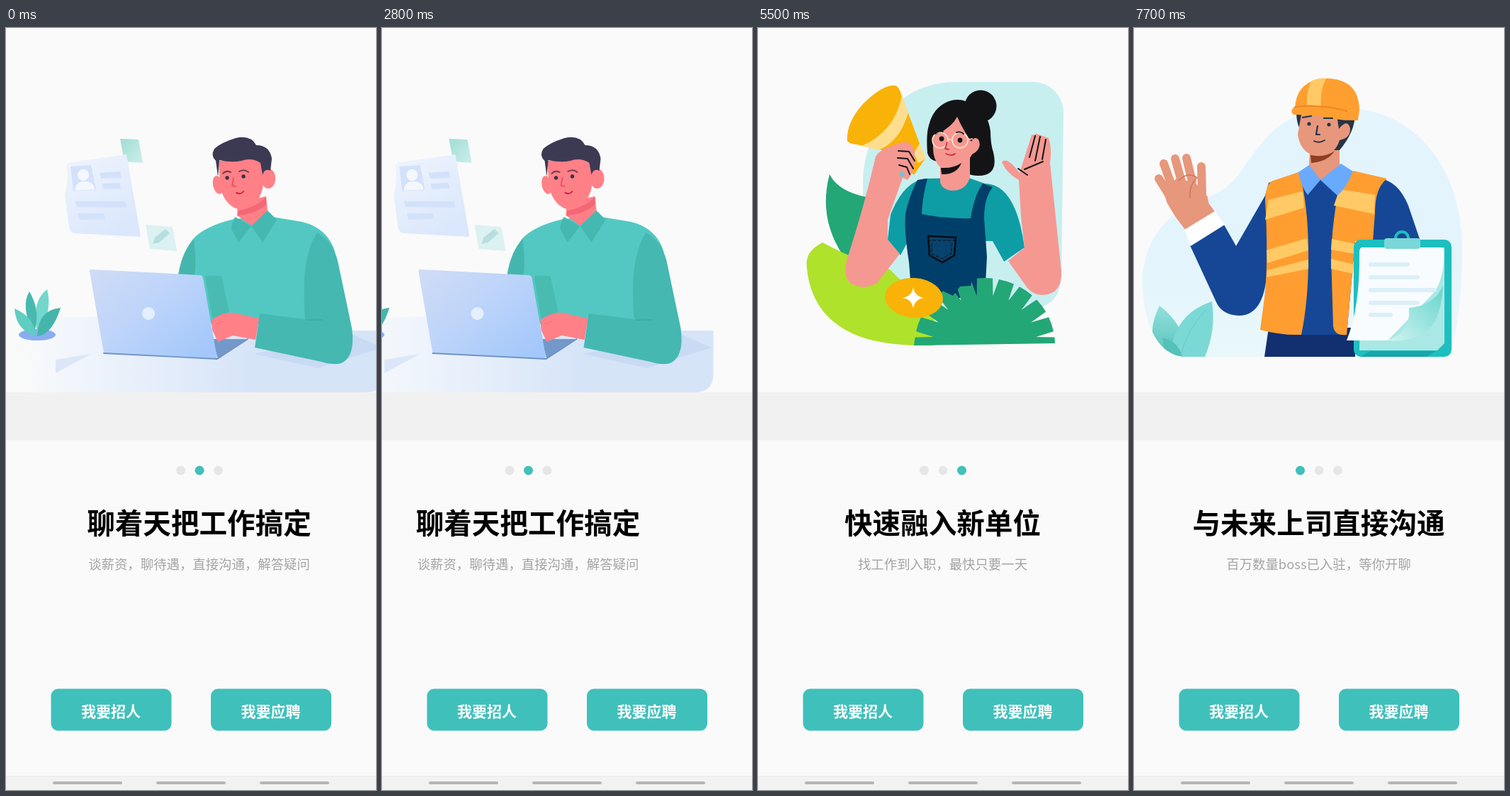
Animation, 522 px wide and 1073 px high, one loop 7.8 s. Source, as an HTML page:

```html
<!DOCTYPE html>
<html lang="zh-CN">
<head>
<meta charset="utf-8">
<style>
  html, body { margin: 0; width: 100%; height: 100%; overflow: hidden; background: #fafafa; }
  svg { display: block; width: 522px; height: 1073px; font-family: "Noto Sans CJK SC", "Noto Sans CJK", sans-serif; text-anchor: middle; }
  .title { font-size: 39.6px; font-weight: 700; }
  .note { font-size: 18.4px; fill: #a4a4a4; }
  .button { font-size: 21px; font-weight: 700; fill: #fff; }
  .line { fill: none; stroke-linecap: round; stroke-linejoin: round; }
</style>
</head>
<body>
<svg viewBox="0 0 522 1073">
  <defs>
    <linearGradient id="blob" x2="0" y2="1"><stop offset=".6" stop-color="#e3f4fd"/><stop offset="1" stop-color="#e9f8f9"/></linearGradient>
    <linearGradient id="curl" x1="1" x2="0" y2="1"><stop stop-color="#66d4ce"/><stop offset="1" stop-color="#d3f4f1"/></linearGradient>
    <linearGradient id="leaf" x2="0" y2="1"><stop stop-color="#92e0dc"/><stop offset="1" stop-color="#56c3bb"/></linearGradient>
    <linearGradient id="desk"><stop stop-color="#fafafa"/><stop offset=".18" stop-color="#f0f5fc"/><stop offset=".65" stop-color="#d6e4f8"/><stop offset="1" stop-color="#d6e4f8"/></linearGradient>
    <linearGradient id="lid" x2="1" y2=".8"><stop stop-color="#d0dcf6"/><stop offset=".5" stop-color="#bdd4fa"/><stop offset="1" stop-color="#a4c8fb"/></linearGradient>
    <linearGradient id="sheet" x2=".6" y2="1"><stop stop-color="#f0f5fd"/><stop offset="1" stop-color="#dae7fc"/></linearGradient>
    <linearGradient id="tile" x2="1" y2="1"><stop stop-color="#9fddd5"/><stop offset="1" stop-color="#cfeeea"/></linearGradient>
    <clipPath id="blobClip"><use href="#blobShape"/></clipPath>
  </defs>
  <rect width="522" height="1073" fill="#fafafa"/>
  <rect y="513" width="522" height="68" fill="#f1f1f1"/>

  <g id="track">
    <!-- Worker -->
    <g>
      <path id="blobShape" fill="url(#blob)" d="M12 355C13 300 48 254 105 238C150 222 155 185 195 146C225 118 270 108 330 116C415 135 463 215 463 310Q463 370 455 422Q449 463 408 463H75C28 463 12 405 12 355Z"/>
      <g clip-path="url(#blobClip)">
        <path fill="url(#leaf)" d="M36 391Q12 440 45 463H75Q72 418 36 391Z"/>
        <path fill="#7bd9d5" d="M110 385Q54 404 52 463H100Q116 425 110 385Z"/>
        <path fill="#55c2ba" d="M40 436Q62 440 68 463H44Z"/>
        <path fill="none" stroke="#5fc8c1" d="M101 397Q75 425 65 463"/>
      </g>
      <path fill="#122f70" d="M190 422H312V463H184Z"/>
      <path fill="#164796" d="M233 203L345 212Q372 214 387 250L404 300H312L300 432H215L188 335Q186 405 148 405Q124 404 116 386L79 306L127 277L144 307L185 236L190 218Z"/>
      <path fill="#ff9d30" d="M233 203L196 215Q186 219 185 242Q190 330 184 380L178 425Q208 433 236 432Q247 380 246 310Q245 245 233 203ZM309 201L357 212Q340 225 340 260L337 300L312 300L300 432Q283 434 281 420L278 320Q280 270 289 228Z"/>
      <path fill="#ffca66" d="M190 242L238 230L240 253L185 270ZM187 313L244 296L246 313L188 331ZM188 341L246 326V339L187 351ZM290 227L340 235L339 262L282 250ZM279 297L312 304L311 318L278 312ZM278 325L310 333L309 346L278 339Z"/>
      <path fill="#e7977b" d="M248 168H290V193Q283 208 263 214Q250 205 247 193Z"/>
      <path fill="#69aaff" d="M247 193L232 203Q236 224 245 235L263 214ZM292 191L309 202Q299 226 287 236L263 214Z"/>
      <path fill="#273447" d="M229 120H312Q312 146 290 172H280L282 130H240L237 145Q230 140 229 120Z"/>
      <path fill="#e7977b" d="M236 122H286L289 142Q301 127 305 141Q306 155 290 158Q283 181 258 180Q235 177 231 150Z"/>
      <path fill="#8f3d24" d="M249 179Q270 183 283 173Q274 188 250 190Z"/>
      <path fill="#ff9f2f" d="M227 112Q230 72 272 71Q317 72 318 115L316 130Q286 131 260 123L225 122Q219 117 227 110Z"/>
      <path fill="#ffca66" d="M251 74Q261 70 271 71Q262 88 264 111L244 109Q243 87 251 74Z"/>
      <path class="line" stroke="#ee8622" stroke-width="2" d="M228 111Q267 107 300 117"/>
      <g class="line" stroke="#273447" stroke-width="2.2"><path d="M238 126L250 124M268 127L280 127M259 138L257 150L262 150"/><path stroke-width="1.8" d="M254 159Q261 163 269 158"/></g>
      <g fill="#273447"><circle cx="247" cy="135" r="2.6"/><circle cx="275" cy="136" r="2.6"/></g>
      <path fill="#fff" d="M71 284L114 258L128 277L80 307Z"/>
      <g fill="#e7977b" stroke="#e7977b" class="line">
        <path style="fill:#e7977b" d="M43 232L60 212L86 218L103 237L105 247L113 258L72 283Q57 265 47 246Z"/>
        <path stroke-width="12" d="M50 236L35 212M54 224L42 191M67 216L58 184M82 216L74 183M96 235L95 195"/>
      </g>
      <path class="line" stroke="#c97860" stroke-width="1.5" d="M63 215Q75 202 88 210M79 239Q78 220 89 211"/>
      <rect x="310" y="298" width="138" height="165" rx="10" fill="#1ebfbf"/>
      <path fill="#a9e8e5" d="M320 309H438V444L428 454H318Z"/>
      <path fill="#16a6aa" d="M320 463L333 455H425L413 463Z"/>
      <path fill="#f8fcfe" d="M322 309H433Q438 309 437 317Q438 354 422 374L358 440H300Q319 393 318 316Q318 309 322 309Z"/>
      <path fill="url(#curl)" d="M436 363Q423 391 388 394Q391 430 355 440Q390 443 413 427Q433 411 436 363Z"/>
      <path class="line" stroke="#dceff8" stroke-width="6" d="M334 333H386M334 351H400M334 369H424M334 387H400M334 404H362"/>
      <circle cx="378" cy="296" r="9" fill="none" stroke="#1ebfbf" stroke-width="4"/>
      <rect x="353" y="296" width="51" height="15" rx="4" fill="#7ad7d7"/>
    </g>

    <!-- Man at a laptop -->
    <g transform="translate(510)">
      <path fill="url(#desk)" d="M12 408L440 404L490 426H534V486Q534 513 508 513H12Z"/>
      <path fill="#dbe7f8" d="M70 467L120 459L70 486Z"/>
      <path fill="#c9daf3" d="M350 459L485 430L531 450L440 479Z"/>
      <path fill="url(#tile)" d="M161 156L187 157L193 190L167 188Z"/>
      <path fill="url(#sheet)" d="M90 189L170 178L190 294L96 289Q90 287 89 280L83 235Q89 210 85 193Z"/>
      <path fill="#d3e2fa" d="M91 195L120 193L127 227L95 230ZM132 204L161 202L163 211L134 212ZM135 219L160 218L162 226L137 227ZM97 244L168 244L170 253L100 252ZM101 261L138 261L140 269L104 270Z"/>
      <g fill="#f4f8fe"><circle cx="109" cy="207" r="8"/><path d="M97 229Q99 215 111 216Q124 216 125 227Z"/></g>
      <path fill="#dcf1f1" d="M197 277L235 280L241 314L203 311Z"/>
      <path fill="#b7dfdf" d="M207 304L210 295L225 283L231 289L216 302Z"/>
      <ellipse cx="44" cy="432" rx="26" ry="8" fill="#88aef0"/>
      <path fill="#72d7cc" d="M58 368Q34 386 45 433Q66 399 58 368Z"/>
      <path fill="#48b9ae" d="M33 371Q20 392 39 431Q50 400 33 371Z"/>
      <path fill="#5fcdc2" d="M12 395Q14 425 41 434Q42 408 12 395Z"/>
      <path fill="#45b5ac" d="M77 394Q45 397 44 434Q65 432 77 394Z"/>

      <path fill="#53c8c2" d="M322 269Q280 279 264 297Q248 318 243 348L292 420L420 414L464 315Q454 282 418 273L370 265Z"/>
      <path fill="#45b6ae" d="M265 297Q269 330 266 348H243Q248 315 265 297Z"/>
      <path fill="#49bbb1" d="M281 349H304L315 400L291 409Z"/>
      <path fill="#f9fdff" d="M426 403L430 411H425Z"/>
      <path fill="#45b8b2" d="M439 288Q461 300 468 328L488 423Q493 461 475 471Q466 476 445 470L351 450L358 402L422 410Q415 323 439 288Z"/>
      <path class="line" stroke="#2fa59e" d="M425 411L446 411"/>
      <path fill="#ff8087" d="M327 246L367 237L369 258Q355 273 346 278L326 264Z"/>
      <path fill="#45b8b1" d="M323 266Q317 278 318 283L328 302L346 279ZM369 257L382 270L362 302L346 279Z"/>
      <path fill="#f46775" d="M328 257Q352 253 367 238V249Q350 263 327 264Z"/>
      <g fill="#ff8087"><ellipse cx="299" cy="221" rx="7" ry="13" transform="rotate(-12 299 221)"/><ellipse cx="370" cy="212" rx="10" ry="14"/><path d="M300 187L363 184Q368 231 351 246Q337 258 324 254Q308 247 302 224Z"/></g>
      <path fill="#3c3a53" d="M299 210L296 187Q288 180 294 170Q304 161 324 155Q345 150 353 165Q372 165 375 184L373 201Q365 197 362 207L359 190Q347 182 332 187Q318 190 301 186Z"/>
      <g class="line" stroke="#793f4d" stroke-width="2"><path d="M306 205Q310 200 317 203M329 202Q336 198 342 203"/><path stroke="#e65462" d="M321 211L319 222L324 223"/><path stroke="#c92d44" d="M325 232Q331 235 335 230"/></g>
      <g fill="#3c3245"><circle cx="312" cy="211" r="2.7"/><circle cx="335" cy="209" r="2.7"/></g>
      <path fill="#7399cb" d="M291 438L340 438L299 466Z"/>
      <path fill="#ff8087" d="M290 411Q307 399 321 401L357 409L352 439L320 433L299 442L291 425Z"/>
      <path class="line" stroke="#f26b75" d="M296 417L306 413"/>
      <path fill="url(#lid)" d="M121 340L273 348Q277 348 278 352L298 466L138 458L118 343Q117 340 121 340Z"/>
      <path class="line" stroke="#6f94c4" stroke-width="1.8" d="M138 458L298 466L341 438"/>
      <circle cx="201" cy="402" r="9" fill="#e5effd"/>
    </g>

    <!-- Woman with a megaphone -->
    <g transform="translate(1044)">
      <path fill="#c8eff0" d="M148 215C150 145 195 76 280 76H388A43 43 0 0 1 431 119L428 350Q426 388 395 394H210L148 250Z"/>
      <path fill="#23a776" d="M101 206Q113 230 153 238L150 330H127Q83 273 101 206Z"/>
      <path fill="#afe22b" d="M91 302Q65 315 69 338Q75 403 133 430Q173 449 250 447L248 390Q210 366 185 339Q143 330 91 302Z"/>
      <path fill="#f9b207" d="M126 159Q124 134 148 107Q177 79 193 81Q198 82 200 88L236 184L220 207L185 174L139 164Q128 163 126 159Z"/>
      <path fill="#fdde8e" d="M203 96L212 119Q200 161 169 172L146 166Q192 147 203 96ZM228 162L237 184L226 190L220 176Z"/>
      <circle cx="314" cy="110" r="22.500" fill="#141416"/>
      <path fill="#141416" d="M239 176Q237 150 241 137Q248 109 273 102Q291 98 306 111Q325 120 328 146Q328 163 332 175Q340 208 311 208Q290 208 282 190L252 188Q241 185 239 176Z"/>
      <path fill="#0e9da4" d="M235 212Q205 217 187 263L183 298L201 320L216 292L331 301L347 329L376 309Q364 220 320 219L297 211Z"/>
      <path fill="#f59891" d="M247 152Q273 141 281 125Q290 145 301 160Q305 152 311 157Q317 170 302 178L299 183V210Q294 229 274 229Q256 227 257 213V196Q246 185 247 165Z"/>
      <path fill="#141416" d="M258 197Q276 198 287 190Q280 207 259 206Z"/>
      <path fill="#c8eff0" d="M320 300H331L347 329L330 345Z"/>
      <path fill="#003f69" d="M225 214L239 212Q232 238 231 262Q267 269 300 268Q305 236 317 219L331 224Q319 239 319 268L323 322L320 380H217L213 330Q206 285 208 262Q213 237 225 214Z"/>
      <path fill="#07436c" stroke="#0b0d13" stroke-width="2.500" d="M240 293L279 295L277 320L260 330L242 320Z"/>
      <path class="line" stroke="#0b0d13" stroke-dasharray="4 3" d="M240 299H278M245 304V318L260 325L273 317V304"/>
      <g fill="#f59891">
        <path d="M166 181Q172 169 208 160Q222 164 221 179Q223 201 211 214L204 211L183 270V298L200 318L168 359Q147 371 129 358Q118 346 128 318Q150 250 166 181Z"/>
        <path d="M344 189Q351 180 369 204Q375 185 386 151L393 149L410 155Q415 170 412 190L428 343Q429 374 403 376Q388 376 380 366L353 328L376 309L371 265L368 214Q351 205 344 189Z"/>
      </g>
      <path class="line" stroke="#141416" stroke-width="2" d="M198 173L213 174L221 187M197 183L211 184L219 198M199 193L210 196L214 206M383 182L391 152M391 187L398 153M401 185L406 157M367 198L380 207M376 199L402 188"/>
      <circle cx="203" cy="206" r="3.5" fill="#6cc6d4"/>
      <g fill="none" stroke="#fde3cf" stroke-width="1.6"><circle cx="257" cy="158" r="11"/><circle cx="285" cy="158" r="11"/><path d="M268 157H274M296 157L303 156"/></g>
      <g fill="#141416"><circle cx="259" cy="156" r="3.4"/><circle cx="285" cy="158" r="3.4"/></g>
      <g class="line" stroke="#141416" stroke-width="1.8"><path d="M250 149Q254 144 261 146M280 147Q286 145 290 149"/><path stroke="#d32d3b" d="M267 161L264 170L269 171M265 177Q273 181 278 177"/></g>
      <path id="palm" fill="#23a776"/>
      <path fill="#003f69" d="M248 352L303 351L300 363L285 364L275 377L262 371Z"/>
      <ellipse cx="220" cy="380" rx="41" ry="28" fill="#f9b207" transform="rotate(4 220 380)"/>
      <path fill="#fff" d="M219 365Q221 378 234 380Q221 382 219 395Q217 382 204 380Q217 378 219 365Z"/>
    </g>
  </g>

  <g id="buttons"></g>
  <path fill="#f2f2f2" d="M0 1053H522V1073H0Z"/>
  <path stroke="#e9e9e9" d="M0 1053.5H522"/>
  <path class="line" stroke="#b5b5b5" stroke-width="4" d="M68 1063H162M214 1063H308M360 1063H454"/>
</svg>
<script>
const WIDTH = 522, LOOP = 7800, STEP = 100, GLIDE = 321;
const pages = [
  ["与未来上司直接沟通", "百万数量boss已入驻，等你开聊"],
  ["聊着天把工作搞定", "谈薪资，聊待遇，直接沟通，解答疑问"],
  ["快速融入新单位", "找工作到入职，最快只要一天"]
];
// Each glide: start time, page left, page reached.
const glides = [[-170, 0, 1], [2793, 1, 2], [5789, 2, 0]];

const track = document.getElementById("track");
const label = (kind, x, y, text) => `<text class="${kind}" x="${x}" y="${y}">${text}</text>`;

pages.forEach(([title, note], page) => {
  const dots = [0, 1, 2].map(i =>
    `<circle cx="${234.5 + i * 26.5}" cy="623" r="6.5" fill="${i === page ? "#40c0ba" : "#e6e6e6"}"/>`).join("");
  track.insertAdjacentHTML("beforeend", `<g transform="translate(${page * WIDTH})">${dots}` +
    label("title", 260.5, 712, title) + label("note", 260.5, 761.5, note) + "</g>");
});

document.getElementById("buttons").innerHTML = [["我要招人", 63.5], ["我要应聘", 289]].map(([text, x]) =>
  `<rect x="${x}" y="930.5" width="170" height="59" rx="10" fill="#40c0bb"/>` + label("button", x + 84.5, 969.5, text)).join("");

// Half a fan of blades, parted by pointed notches.
function palmPath() {
  const at = (angle, r) => `${320 - 99 * r * Math.cos(angle)} ${446 - 94 * r * Math.sin(angle)}`;
  const notches = 10, slice = Math.PI / notches, gap = 0.045;
  let d = "M220 447";
  for (let i = 0; i < notches; i++) {
    const angle = (i + 0.5) * slice;
    d += `A99 94 0 0 1 ${at(angle - gap, 1)}L${at(angle, 0.74)}L${at(angle + gap, 1)}`;
  }
  return d + "A99 94 0 0 1 419 444Z";
}
document.getElementById("palm").setAttribute("d", palmPath());

function scrollAt(time) {
  const [start, from, to] = glides.findLast(g => g[0] <= time);
  const progress = Math.min(1, (time - start) / GLIDE);
  return WIDTH * (to + (from - to) * (1 - progress) ** 5);
}

function draw(now) {
  const time = Math.floor(now % LOOP / STEP) * STEP;
  track.setAttribute("transform", `translate(${-scrollAt(time)})`);
  requestAnimationFrame(draw);
}
draw(performance.now());
</script>
</body>
</html>
```
